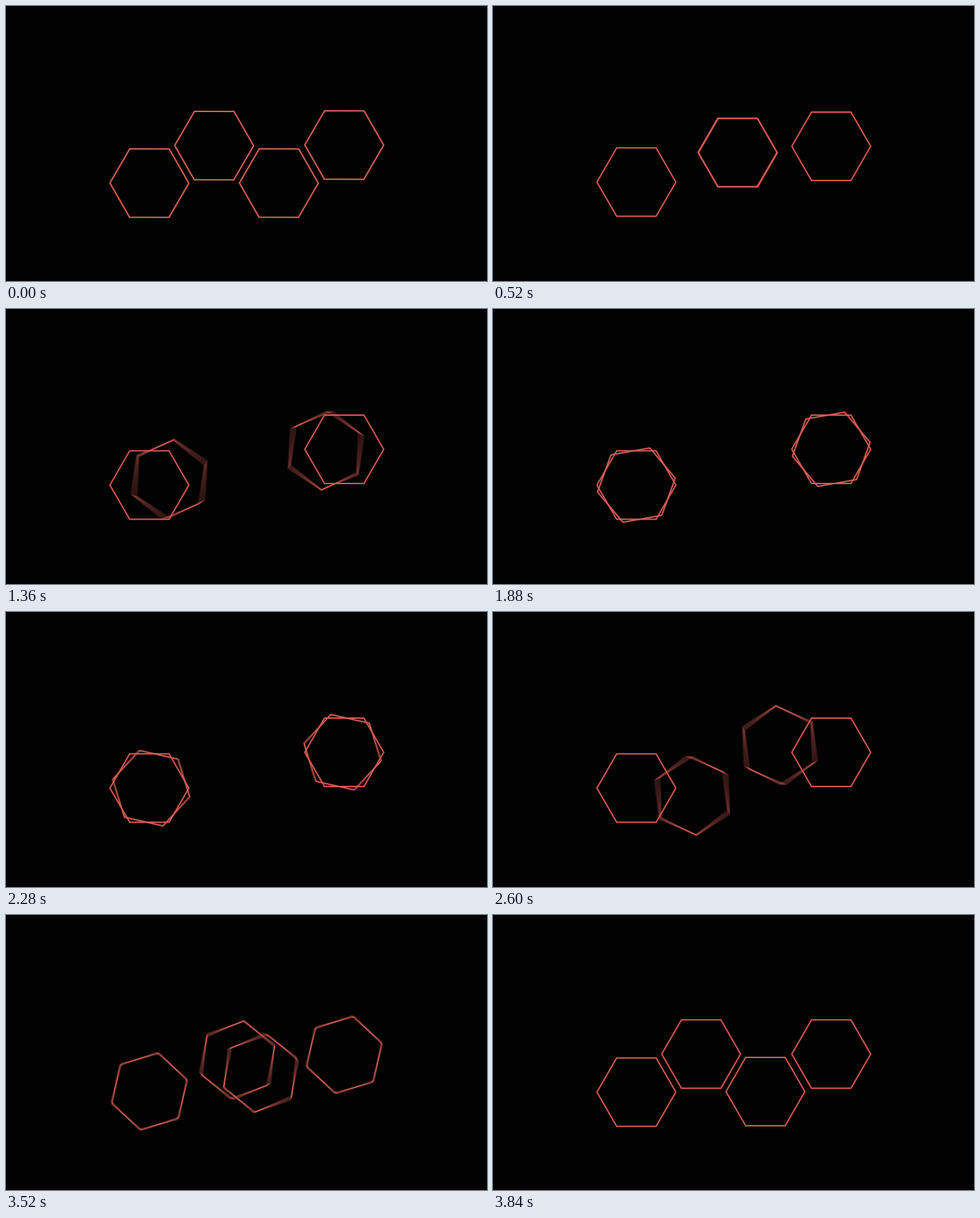
An HTML page that plays this animation: 690x394 px, repeating every 4.32 s.

```html
<!DOCTYPE html>
<html lang="en">
<head>
<meta charset="utf-8">
<title>Hexagon loop</title>
<style>
  html, body { margin: 0; height: 100%; overflow: hidden; background: #020202; }
  svg { display: block; width: 100%; height: 100%; }
  g { isolation: isolate; }
  polygon { fill: none; stroke: #d65751; stroke-width: 2; mix-blend-mode: plus-lighter; }
</style>
</head>
<body>
<svg id="stage" viewBox="0 0 690 394"></svg>
<script>
const LOOP = 4320, STEP = 40, SHUTTER = 20, SAMPLES = 12, RADIUS = 56.6;
const SVG_NS = 'http://www.w3.org/2000/svg';

const hexPoints = Array.from({ length: 6 }, (_, i) => {
  const a = i * Math.PI / 3;
  return `${(RADIUS * Math.cos(a)).toFixed(2)},${(RADIUS * Math.sin(a)).toFixed(2)}`;
}).join(' ');

// Eased progress from 0 to 1 between two times.
function ramp(t, start, end) {
  const u = Math.min(1, Math.max(0, (t - start) / (end - start)));
  return u * u * (3 - 2 * u);
}

// Each move: start, end, x, y and an optional bend of the path.
function follow(t, from, moves) {
  let [x, y] = from;
  for (const [start, end, toX, toY, bend = 1] of moves) {
    const f = ramp(t, start, end);
    x += (toX - x) * f;
    y += (toY - y) * f ** bend;
  }
  return [x, y];
}

// Outer hexagons turn in place while the inner pair joins or parts.
function outerPose(x, restY, shiftedY) {
  return t => {
    const join = ramp(t, 0, 520), part = ramp(t, 3320, 3840);
    return [x, restY + (shiftedY - restY) * (join - part), 120 * (join + part)];
  };
}

function innerAngle(t) {
  return 120 * ramp(t, 0, 520) + 120 * ramp(t, 1000, 1520) + 60 * ramp(t, 1520, 2020)
    + 240 * ramp(t, 2120, 3340) + 120 * ramp(t, 3340, 3840);
}

function innerPose(from, moves) {
  return t => [...follow(t, from, moves), innerAngle(t)];
}

const poses = [
  outerPose(205.7, 253.7, 252.3),
  outerPose(485.2, 199.2, 201),
  innerPose([298.5, 200], [
    [0, 520, 350.7, 209.7],
    [1000, 1520, 205.7, 252.3],
    [2235, 2930, 350.5, 277, 1.4],
    [2920, 3280, 350.7, 212],
    [3320, 3840, 390.8, 253]
  ]),
  innerPose([391.5, 253.7], [
    [0, 520, 351.3, 210.3],
    [1000, 1520, 485.2, 201],
    [2235, 2930, 352, 178, 1.4],
    [2920, 3280, 351.3, 212.5],
    [3320, 3840, 298.6, 199.2]
  ])
];

const make = (tag, parent) => parent.appendChild(document.createElementNS(SVG_NS, tag));
const stage = document.getElementById('stage');
const hexagons = poses.map(pose => {
  const group = make('g', stage);
  const layers = Array.from({ length: SAMPLES }, () => {
    const layer = make('polygon', group);
    layer.setAttribute('points', hexPoints);
    return layer;
  });
  return { pose, layers };
});

// Averages several poses within the shutter time to give motion blur.
function drawHexagon({ pose, layers }, t) {
  const first = pose(t), last = pose(t + SHUTTER);
  const still = first.every((v, i) => Math.abs(v - last[i]) < 0.01);
  layers.forEach((layer, i) => {
    const [x, y, angle] = pose(t + SHUTTER * i / (SAMPLES - 1));
    layer.setAttribute('transform', `translate(${x} ${y}) rotate(${angle % 60})`);
    layer.setAttribute('opacity', still ? (i ? 0 : 1) : 1 / SAMPLES);
  });
}

function render(ms) {
  const t = Math.floor((ms % LOOP) / STEP) * STEP;
  hexagons.forEach(hexagon => drawHexagon(hexagon, t));
}

const startTime = performance.now();
function tick() {
  render(performance.now() - startTime);
  requestAnimationFrame(tick);
}
tick();
</script>
</body>
</html>
```
